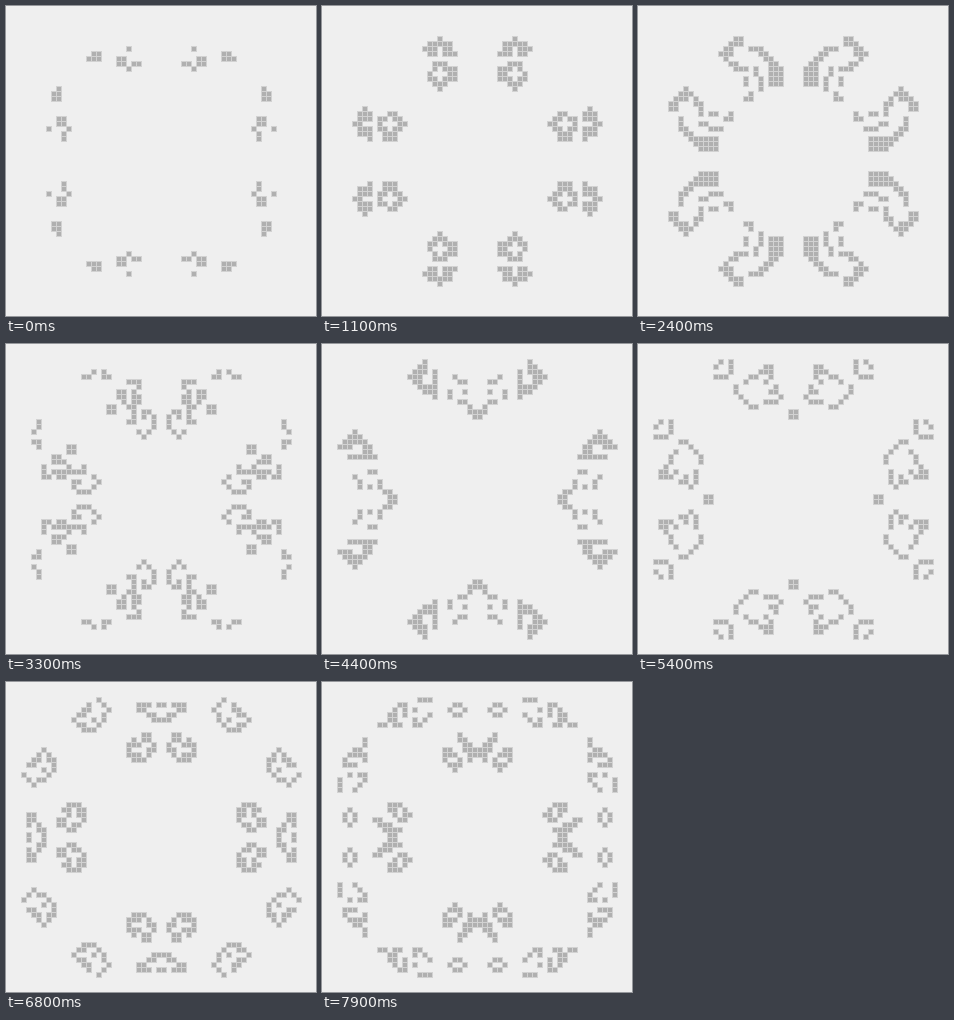
An HTML page with a canvas that plays this animation: 310x310 px, repeating every 8 s.

```html
<!DOCTYPE html>
<html lang="en">
<head>
<meta charset="utf-8">
<title>Cellular automaton</title>
<style>
  html, body { margin: 0; width: 100%; height: 100%; overflow: hidden; background: #efefef; }
  canvas { display: block; }
</style>
</head>
<body>
<canvas id="stage" width="310" height="310"></canvas>
<script>
const SIZE = 62, CELL = 5, STEP = 100, STEPS = 80;
const ctx = document.getElementById('stage').getContext('2d');

// One octant of the starting pattern; the rest follows by symmetry.
const seed = [
  [17, 9], [18, 9], [16, 10], [17, 10], [18, 10],
  [24, 8], [22, 10], [23, 10], [22, 11], [23, 11], [25, 11], [26, 11], [24, 12]
];

function startGrid() {
  const grid = new Uint8Array(SIZE * SIZE);
  const last = SIZE - 1;
  for (const [a, b] of seed) {
    for (const [x, y] of [[a, b], [b, a]]) {
      for (const u of [x, last - x]) {
        for (const v of [y, last - y]) grid[v * SIZE + u] = 1;
      }
    }
  }
  return grid;
}

// Conway's rule: born with three neighbours, survives with two or three.
function evolve(grid) {
  const next = new Uint8Array(SIZE * SIZE);
  for (let y = 1; y < SIZE - 1; y++) {
    for (let x = 1; x < SIZE - 1; x++) {
      const i = y * SIZE + x;
      let sum = -grid[i];
      for (let dy = -1; dy <= 1; dy++) {
        for (let dx = -1; dx <= 1; dx++) sum += grid[i + dy * SIZE + dx];
      }
      next[i] = sum === 3 || (sum === 2 && grid[i]) ? 1 : 0;
    }
  }
  return next;
}

const history = [startGrid()];
while (history.length < STEPS) history.push(evolve(history[history.length - 1]));

function fillCells(grid, color, inset, size) {
  ctx.fillStyle = color;
  grid.forEach((alive, i) => {
    if (!alive) return;
    const x = (i % SIZE) * CELL, y = Math.floor(i / SIZE) * CELL;
    ctx.fillRect(x + inset, y + inset, size, size);
  });
}

function draw(grid) {
  ctx.fillStyle = '#efefef';
  ctx.fillRect(0, 0, SIZE * CELL, SIZE * CELL);
  fillCells(grid, '#d2d2d2', 0, CELL + 1);
  fillCells(grid, '#b0b0b0', 1, CELL - 1);
}

const start = performance.now();
let shown = -1;

function tick() {
  const step = Math.floor((performance.now() - start) / STEP) % STEPS;
  if (step !== shown) {
    shown = step;
    draw(history[step]);
  }
  requestAnimationFrame(tick);
}
tick();
</script>
</body>
</html>
```
